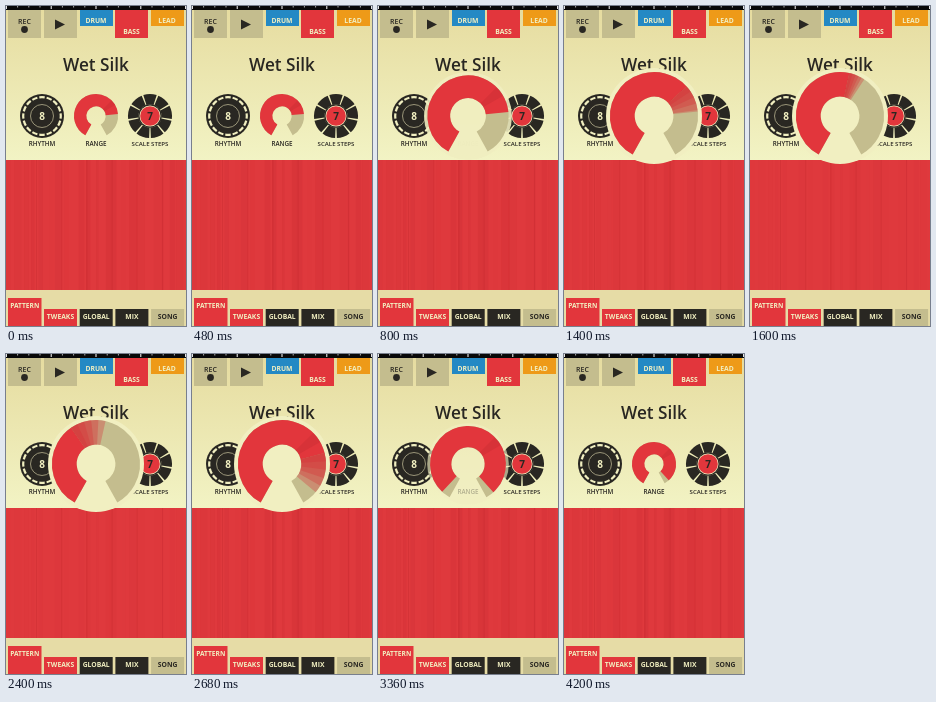
An HTML page with a canvas for the animation above (4.24 s loop, 180 by 320 pixels).

```html
<!DOCTYPE html>
<html lang="en">
<head>
<meta charset="utf-8">
<style>
html, body { margin: 0; width: 100%; height: 100%; overflow: hidden; background: #e6dca6; }
canvas { display: block; width: 180px; height: 320px; }
</style>
</head>
<body>
<canvas id="stage"></canvas>
<script>
const LOOP = 4240, DARK = '#292722', CREAM = '#f1efc1', TAN = '#c4bd8e', RED = '#e2363c';
const canvas = document.getElementById('stage'), c = canvas.getContext('2d');
const dpr = window.devicePixelRatio || 1;
canvas.width = 180 * dpr;
canvas.height = 320 * dpr;
c.scale(dpr, dpr);

const clamp = x => Math.min(1, Math.max(0, x));
const easeOut = x => 1 - (1 - clamp(x)) ** 3;

// Dial end angle in degrees, by time
const keys = [[0, 355], [1300, 354], [1400, 318], [1800, 247], [1920, 235],
  [2120, 232], [2280, 235], [2560, 345], [2680, 400], [2800, 408], [LOOP, 408]];

function dialEnd(t) {
  t = Math.max(0, t);
  const i = Math.max(1, keys.findIndex(k => k[0] >= t));
  const [t0, a] = keys[i - 1], [t1, b] = keys[i];
  return a + (b - a) * (t - t0) / (t1 - t0);
}

function rect(x, y, w, h, color) {
  c.fillStyle = color;
  c.fillRect(x, y, w, h);
}

function disc(x, y, r, color) {
  c.fillStyle = color;
  c.beginPath();
  c.arc(x, y, r, 0, 7);
  c.fill();
}

function text(s, x, y, size, color, weight = 700) {
  c.font = `${weight} ${size}px "Open Sans", "Noto Sans", sans-serif`;
  c.textAlign = 'center';
  c.fillStyle = color;
  c.fillText(s, x, y);
}

function arc(x, y, r, width, from, to, color) {
  c.strokeStyle = color;
  c.lineWidth = width;
  c.beginPath();
  c.arc(x, y, r, from * Math.PI / 180, to * Math.PI / 180);
  c.stroke();
}

// A ring of n equal pieces, the first centred at the top, with gaps in degrees
function pieces(x, y, r, width, n, gap, color) {
  const half = 180 / n - gap / 2;
  for (let i = 0; i < n; i++) {
    const a = i * 360 / n - 90;
    arc(x, y, r, width, a - half, a + half, color);
  }
}

function fade(y0, y1, from, to) {
  const g = c.createLinearGradient(0, y0, 0, y1);
  g.addColorStop(0, from);
  g.addColorStop(1, to);
  return g;
}

function background() {
  rect(0, 0, 180, 154, fade(4, 154, '#e6dca0', '#f2f3c4'));
  rect(0, 284, 180, 36, '#e6dca6');
  rect(0, 0, 180, 4, '#080808');
  for (let i = -8; i <= 8; i++)
    rect(89.5 + i * 11.2, 0, 1, i % 4 ? 1.5 : 3, i % 4 ? '#aaa' : '#fff');
}

function panel(end) {
  rect(0, 154, 180, 130, '#df393d');
  const busy = clamp((end - 235) / 110);
  let seed = 11;
  const rnd = () => (seed = seed * 16807 % 2147483647) / 2147483647;
  for (let i = 0; i < 22; i++)
    rect(i * 8 + rnd() * 4, 154, 2 + rnd() * 6, 130, `rgba(160,20,30,${busy * rnd() * .12})`);
  for (let x = 30; x < 180; x += 25.2) rect(x, 154, 1, 130, 'rgba(160,20,30,.15)');
}

function topBar() {
  rect(2, 4, 33, 28, TAN);
  text('REC', 18.5, 17.5, 7, DARK, 600);
  disc(18.5, 23.5, 3.4, DARK);
  rect(38, 4, 33, 28, TAN);
  c.fillStyle = DARK;
  c.beginPath();
  c.moveTo(49, 13.5);
  c.lineTo(59, 18.5);
  c.lineTo(49, 23.5);
  c.fill();
  rect(74, 4, 33, 16, '#2489c4');
  text('DRUM', 90, 16.5, 6.8, CREAM);
  rect(109, 4, 33, 28, RED);
  text('BASS', 125.5, 28, 6.8, CREAM);
  rect(145, 4, 33, 16, '#ee9a18');
  text('LEAD', 161, 16.5, 6.8, CREAM);
}

function bottomBar() {
  rect(2, 292, 33.5, 28, RED);
  text('PATTERN', 18.7, 301.5, 6.6, CREAM);
  [['TWEAKS', RED], ['GLOBAL', DARK], ['MIX', DARK], ['SONG', TAN]].forEach(([s, color], i) => {
    const x = 38 + i * 35.7;
    rect(x, 303, 33, 17, color);
    text(s, x + 16.5, 313, 6.8, color === TAN ? DARK : CREAM);
  });
}

function sideKnobs() {
  disc(36, 110, 22, DARK);
  pieces(36, 110, 18.8, 2.2, 16, 6, CREAM);
  arc(36, 110, 11.5, .8, 0, 360, '#b5b08f');
  text('8', 36, 113.8, 10, CREAM);
  text('RHYTHM', 36, 140, 6.3, DARK, 600);

  pieces(144, 110, 16.8, 10.4, 9, 4.5, DARK);
  disc(144, 110, 11.8, DARK);
  disc(144, 110, 10.5, CREAM);
  disc(144, 110, 9.8, RED);
  text('7', 144, 113.8, 10, DARK);
  text('SCALE STEPS', 144, 140, 6.1, DARK, 600);
}

function dial(t, grow) {
  const x = 90, y = 110, R = 22 + 22 * grow;
  const width = R * .56, mid = R - width / 2;
  c.globalAlpha = clamp((grow - .4) * 2);
  disc(x, y, R + 4 * grow, CREAM);
  c.globalAlpha = clamp((.85 - grow) * 2.5);
  text('RANGE', x, 140, 6.3, DARK, 600);
  c.globalAlpha = 1;

  // The low end pulls back briefly while the dial closes
  const pull = 14 * clamp(1 - Math.abs(t - 3360) / 200);
  const start = 119 + pull;
  arc(x, y, mid, width, 119, 421, TAN);
  const trail = [0, 1, 2, 3, 4, 5].map(k => dialEnd(t - k * 24));
  const solid = Math.min(...trail);
  arc(x, y, mid, width, start, solid, RED);
  for (const end of trail)
    if (end > solid) arc(x, y, mid, width, solid, end, 'rgba(214,46,54,.32)');
  if (solid > 330) arc(x, y, mid, width, 315, 330, 'rgba(150,20,30,.13)');
}

function draw(t) {
  const grow = easeOut((t - 560) / 520) * (1 - easeOut((t - 3310) / 500));
  background();
  panel(dialEnd(t));
  topBar();
  text('Wet Silk', 90, 64.5, 17.2, DARK, 600);
  sideKnobs();
  dial(t, grow);
  bottomBar();
}

const began = performance.now();
function tick() {
  draw((performance.now() - began) % LOOP);
  requestAnimationFrame(tick);
}
tick();
</script>
</body>
</html>
```
